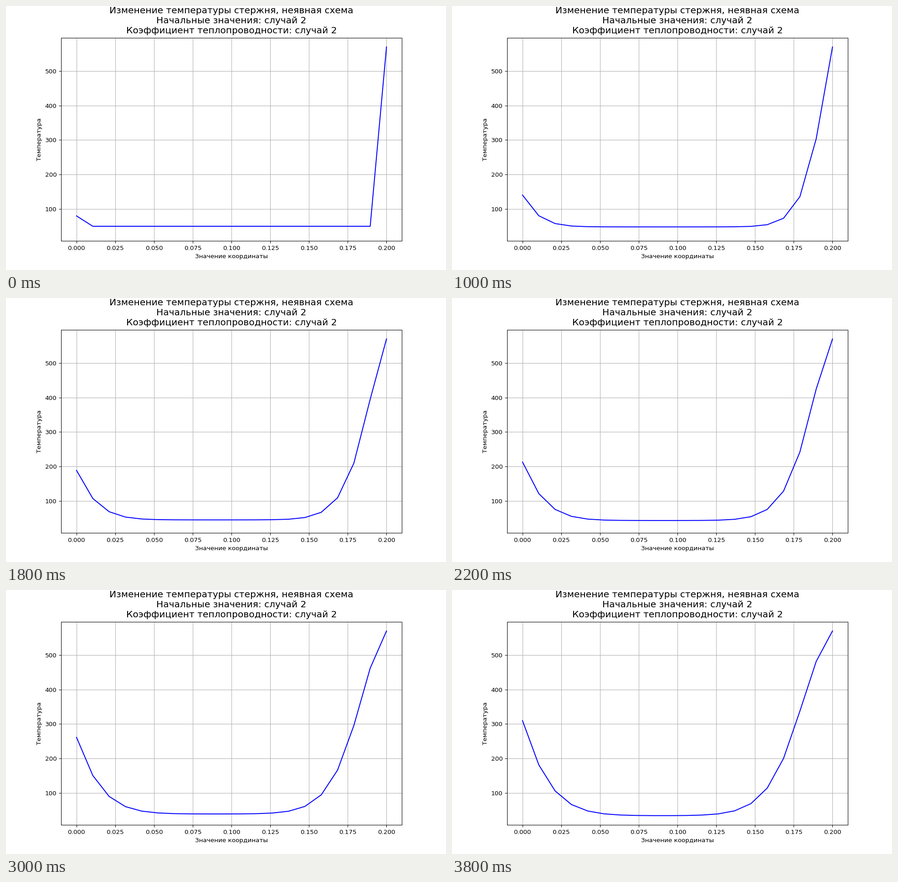
A matplotlib script for the animation above (4 s loop, 966 px wide and 580 px high).

```python
import numpy as np
import matplotlib.pyplot as plt
from matplotlib.animation import FuncAnimation

W, H, DPI = 966, 580, 96.6
FRAMES, STEP_MS = 20, 200
NODES = 20
T_START, T_LEFT, T_RIGHT = 50, 80, 570
LEFT_RATE = 12.1
DROP = 15.8


def cooled(n):
    """Uniform heat loss along the rod after n steps."""
    return DROP * (n / (FRAMES - 1)) ** 1.62


def conductivity(u, n):
    """Value for each gap between nodes, set by its cooler end."""
    cool = np.minimum(u[:-1], u[1:])
    return 0.19 - 0.003 * n + 1e-4 * cool + 0.23 * (cool / 474) ** 4


def implicit_step(u, n):
    rhs = u - (cooled(n) - cooled(n - 1))
    rhs[0], rhs[-1] = T_LEFT + LEFT_RATE * n, T_RIGHT
    new = u
    for _ in range(8):
        k = conductivity(new, n)
        a = np.eye(NODES)
        for i in range(1, NODES - 1):
            a[i, i - 1:i + 2] = -k[i - 1], 1 + k[i - 1] + k[i], -k[i]
        new = np.linalg.solve(a, rhs)
    return new


first = np.full(NODES, float(T_START))
first[0], first[-1] = T_LEFT, T_RIGHT
states = [first]
for n in range(1, FRAMES):
    states.append(implicit_step(states[-1], n))

# The tiny surplus keeps the pixel size from being rounded down
plt.rcParams["font.size"] = 10.1
fig, ax = plt.subplots(figsize=(W / DPI + 1e-6, H / DPI + 1e-6), dpi=DPI)
x = np.linspace(0, 0.2, NODES)
line, = ax.plot(x, first, color="blue", lw=1.5)

pad = 0.05 * (T_RIGHT - T_START + DROP)
ax.set_xlim(-0.01, 0.21)
ax.set_ylim(T_START - DROP - pad, T_RIGHT + pad)
ax.set_yticks(range(100, 600, 100))
ax.grid(True)
ax.set_title("Изменение температуры стержня, неявная схема\n"
             "Начальные значения: случай 2\n"
             "Коэффициент теплопроводности: случай 2",
             fontsize=15, pad=7, linespacing=1.22)
ax.set_xlabel("Значение координаты")
ax.set_ylabel("Температура")


def draw(n):
    line.set_ydata(states[n])
    return line,


anim = FuncAnimation(fig, draw, frames=FRAMES, interval=STEP_MS,
                     repeat=True, repeat_delay=0)
plt.show()
```
